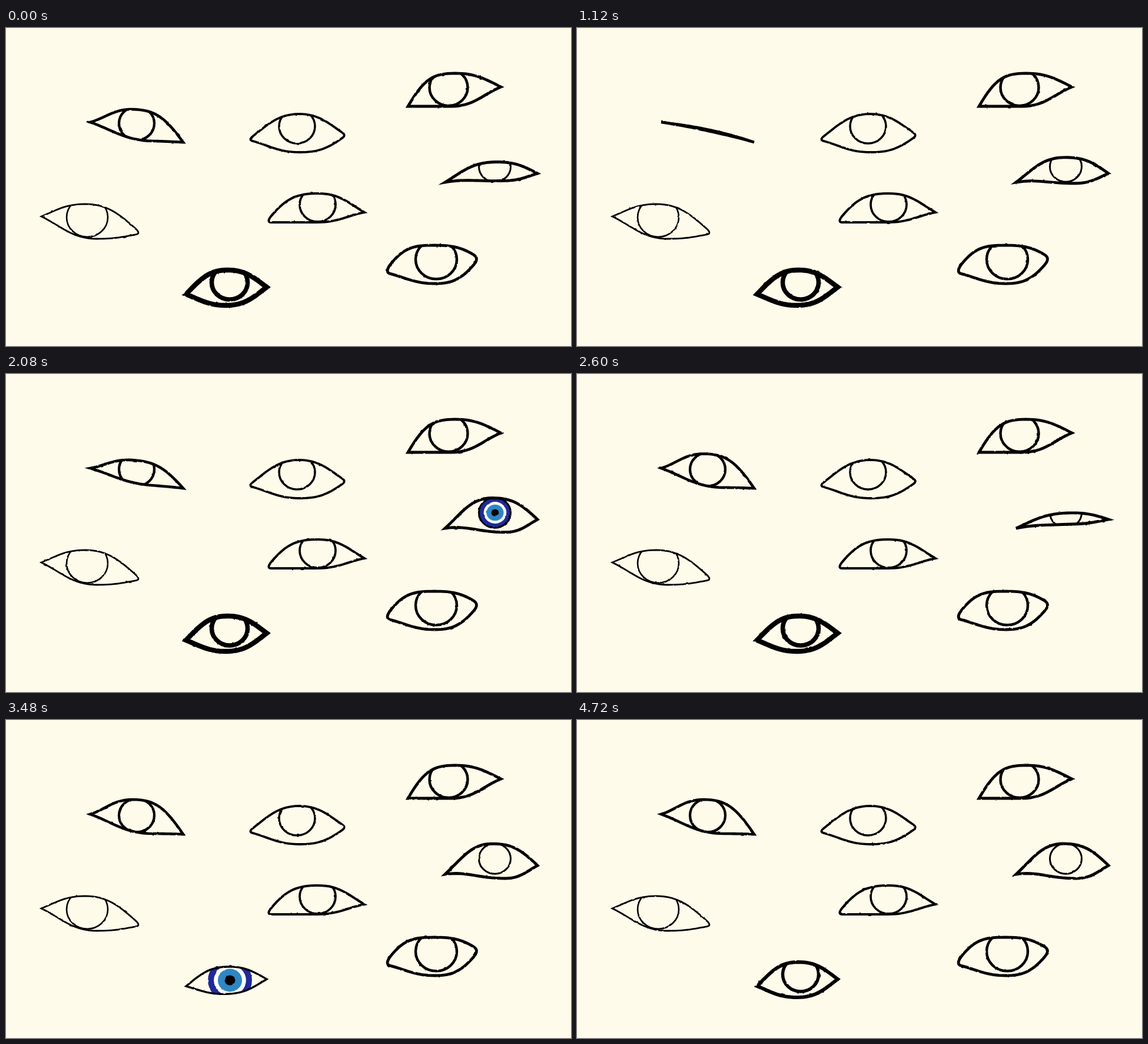
An HTML page that plays this animation: 960x540 px, repeating every 4800 ms.

```html
<!DOCTYPE html>
<html lang="en">
<head>
<meta charset="utf-8">
<title>Blinking eyes</title>
<style>
  html, body { margin: 0; width: 100%; height: 100%; overflow: hidden; background: #fffbea; }
  svg { display: block; width: 100vw; height: 100vh; }
</style>
</head>
<body>
<svg viewBox="0 0 960 540">
  <defs>
    <filter id="rough" filterUnits="userSpaceOnUse" x="0" y="0" width="960" height="540" color-interpolation-filters="sRGB">
      <feTurbulence id="noise" type="fractalNoise" baseFrequency="0.13" numOctaves="2" result="n"/>
      <feDisplacementMap in="SourceGraphic" in2="n" scale="2.2" xChannelSelector="R" yChannelSelector="G"/>
    </filter>
  </defs>
  <g id="eyes" filter="url(#rough)" fill="none" stroke="#000" stroke-miterlimit="6"></g>
</svg>
<script>
const LOOP = 4800;
const CLOSING = 80;
const OPENING = 1200;
const RINGS = [[1, '#1f2a97'], [.73, '#fff'], [.55, '#2f86c3'], [.24, '#000']];

// left, top, right, bottom: the key points of the lids.
// bend: fullness of the quarters left-top, top-right, right-bottom, bottom-left.
// round: how much of the left and right corner is rounded off.
// iris, blue: centre and radius. blinks: moments when the lid is shut;
// a blue iris shows between the last two of them.
const eyes = [
  { left: [143, 160], top: [215, 135], right: [301, 194], bottom: [250, 193],
    bend: [.3, .75, .5, .4], iris: [222, 162, 30], width: 4.6,
    blinks: [-680, 1120, 1680], sag: -3 },
  { left: [683, 133], top: [763, 77], right: [841, 100], bottom: [757, 133],
    bend: [.86, .58, .36, .5], iris: [752, 101, 32.5], width: 4.8 },
  { left: [411, 190], top: [498, 146], right: [578, 182], bottom: [499, 211],
    bend: [.5, .5, .7, .3], round: [.1, .08], iris: [494.5, 167, 30.5], width: 3.8,
    blinks: [4160], opening: 600, sag: -8 },
  { left: [746, 262], top: [826, 210], right: [903, 247], bottom: [848, 269],
    bend: [.5, .7, .5, -.8], iris: [830.5, 235.5, 27], width: 4.9, irisWidth: 3,
    blinks: [-280, 1160, 2450], sag: -5, blue: [831, 235.5, 26.5] },
  { left: [60, 320], top: [134, 299], right: [230, 349], bottom: [155, 358],
    bend: [.5, .57, .5, .42], round: [0, .12], iris: [138, 321.5, 35], width: 2.8 },
  { left: [442, 330], top: [531, 281], right: [609, 313], bottom: [528, 330],
    bend: [.82, .5, .32, -.5], round: [.1, 0], iris: [529.5, 300, 30.5], width: 4 },
  { left: [306, 452], top: [376, 411], right: [443, 440], bottom: [374, 471],
    bend: [.62, .6, .6, .5], iris: [380, 432, 30.5], width: 8.4,
    blinks: [3000, 3550], sag: 0, blue: [380.5, 442, 37.5], noRim: true, regrow: true },
  { left: [643, 415], top: [728, 369], right: [804, 391], bottom: [729, 434],
    bend: [.93, .8, .76, .3], round: [.12, .12], iris: [731, 393, 35], width: 4.8 }
];

const noise = document.getElementById('noise');
const layer = document.getElementById('eyes');
const defs = document.querySelector('defs');

function add(parent, tag, attrs = {}) {
  const el = document.createElementNS('http://www.w3.org/2000/svg', tag);
  for (const k in attrs) el.setAttribute(k, attrs[k]);
  return parent.appendChild(el);
}

function oval(parent, [cx, cy, r], attrs) {
  return add(parent, 'ellipse', { cx, cy, rx: r, ry: r * .95, ...attrs });
}

// Quarter of a lid from a corner to an apex, where it runs level.
function quarter([x0, y0], [x1, y1], bend, cut) {
  const dx = x1 - x0, dy = y1 - y0, steps = 16;
  return Array.from({ length: steps + 1 }, (_, i) => {
    const t = cut + (1 - cut) * i / steps, s = 1 - t;
    const a = 3 * s * s * t, b = 3 * s * t * t, c = t * t * t;
    return [x0 + dx * (.35 * a + .55 * b + c), y0 + dy * (bend * a + b + c)];
  });
}

function lidPath(eye, open) {
  const { left, top, right, bottom, bend, round = [0, 0], sag } = eye;
  const shutY = x => {
    const u = (x - left[0]) / (right[0] - left[0]);
    return left[1] + (right[1] - left[1]) * u + sag * 4 * u * (1 - u);
  };
  const place = ([x, y]) => {
    const py = open < 1 ? shutY(x) + (y - shutY(x)) * open : y;
    return x.toFixed(2) + ' ' + py.toFixed(2);
  };
  const line = pts => pts.map(place).join('L');
  const upper = [...quarter(left, top, bend[0], round[0]), ...quarter(right, top, bend[1], round[1]).reverse()];
  const lower = [...quarter(right, bottom, bend[2], round[1]), ...quarter(left, bottom, bend[3], round[0]).reverse()];
  const corner = (p, cut, next) => cut ? `Q${place(p)} ${place(next)}` : '';
  return 'M' + line(upper) + corner(right, round[1], lower[0]) +
         'L' + line(lower) + corner(left, round[0], upper[0]) + 'Z';
}

// Lids snap shut before each blink and ease open after it.
function openness({ blinks = [], opening = OPENING }, t) {
  const next = blinks.find(b => b > t);
  const last = blinks.filter(b => b <= t).pop();
  let open = 1;
  if (last !== undefined) open = 1 - (1 - Math.min(1, (t - last) / opening)) ** 3;
  if (next - t < CLOSING) open *= 1 - (1 - (next - t) / CLOSING) ** 2;
  return Math.max(.04, open);
}

function pose(eye, t) {
  const d = lidPath(eye, openness(eye, t));
  eye.clip.setAttribute('d', d);
  eye.outline.setAttribute('d', d);
  if (eye.regrow) {
    const age = t - eye.blinks[0];
    const width = age < 0 ? eye.width : 2.4 + age * .0021;
    eye.outline.setAttribute('stroke-width', width);
    eye.ring.setAttribute('stroke-width', width * .9);
  }
  if (eye.blue) {
    const [from, to] = eye.blinks.slice(-2);
    const blue = t >= from && t < to;
    eye.blueIris.style.display = blue ? '' : 'none';
    eye.ring.style.display = blue && eye.noRim ? 'none' : '';
  }
}

eyes.forEach((eye, i) => {
  eye.clip = add(add(defs, 'clipPath', { id: 'lid' + i }), 'path');
  const inner = add(layer, 'g', { 'clip-path': `url(#lid${i})` });
  if (eye.blue) {
    const [cx, cy, r] = eye.blue;
    eye.blueIris = add(inner, 'g', { stroke: 'none' });
    RINGS.forEach(([k, fill]) => oval(eye.blueIris, [cx, cy, r * k], { fill }));
  }
  eye.ring = oval(inner, eye.iris, { 'stroke-width': eye.irisWidth || eye.width * .93 });
  eye.outline = add(layer, 'path', { 'stroke-width': eye.width });
  pose(eye, 0);
});

// First half: 11 drawings per 600 ms on a 40 ms grid; second half: one per 40 ms.
function hold(t) {
  if (t >= 2400) return Math.min(4720, Math.floor(t / 40) * 40);
  const start = n => Math.ceil(n * 15 / 11) * 40;
  let n = Math.floor(t * 11 / 600);
  if (start(n) > t) n--;
  return start(n);
}

let shown = -1;
function draw(now) {
  const t = hold(now % LOOP);
  if (t !== shown) {
    shown = t;
    noise.setAttribute('seed', t / 40 + 1);
    eyes.forEach(eye => eye.blinks && pose(eye, t));
  }
  requestAnimationFrame(() => draw(performance.now() - begin));
}

const begin = performance.now();
draw(0);
</script>
</body>
</html>
```
